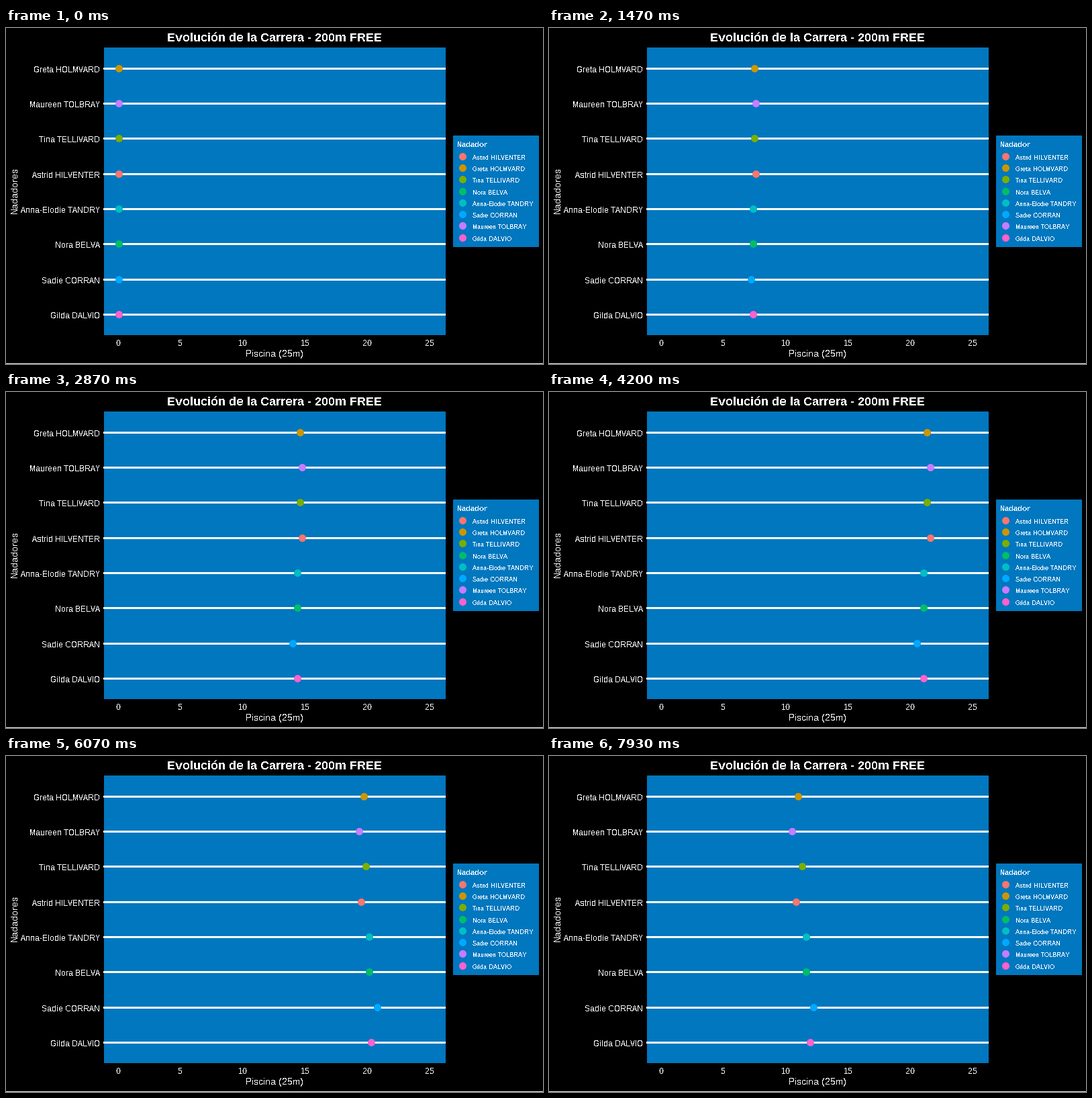
These frames come from a looping animation (800 by 500 pixels, 8 s). A matplotlib script:

```python
import math

import matplotlib.pyplot as plt
from matplotlib.animation import FuncAnimation
from matplotlib.patches import Rectangle

plt.rcParams.update({
    "font.family": "Liberation Sans",
    "text.hinting": "native",
    "text.hinting_factor": 1,
    "text.antialiased": False,
    "toolbar": "None",
})

W, H, DPI = 800, 500, 100
PT = 72 / DPI            # points per pixel
LOOP, INTERVAL = 8000, 20
STEP = LOOP / 120        # the race advances 15 times a second
POOL = "#0077BE"
START, LENGTH = 168.5, 464   # left wall and pool length in pixels
DOT = 11

# name, colour, steps for the first and second length, top lane first
SWIMMERS = [
    ("Greta HOLMVARD", "#CD9600", 74, 80),
    ("Maureen TOLBRAY", "#C77CFF", 73, 79),
    ("Tina TELLIVARD", "#7CAE00", 74, 82),
    ("Astrid HILVENTER", "#F8766D", 73, 81),
    ("Anna-Elodie TANDRY", "#00BFC4", 75, 82),
    ("Nora BELVA", "#00BE67", 75, 82),
    ("Sadie CORRAN", "#00A9FF", 77, 82),
    ("Gilda DALVIO", "#FF61CC", 75, 84),
]
LEGEND_ORDER = [3, 0, 2, 5, 4, 6, 1, 7]

fig = plt.figure(figsize=(W / DPI, H / DPI), dpi=DPI, facecolor="black")
ax = fig.add_axes([0, 0, 1, 1])
ax.set_xlim(0, W)
ax.set_ylim(H, 0)
ax.axis("off")


def box(x0, y0, x1, y1, color, z=1):
    ax.add_patch(Rectangle((x0, y0), x1 - x0, y1 - y0, facecolor=color,
                           linewidth=0, antialiased=False, zorder=z))


def label(x, y, text, px, ha="center", **kw):
    ax.text(x, y, text, color="white", fontsize=px * PT, ha=ha,
            va="baseline", zorder=5, **kw)


def dots(xs, ys, colors):
    return ax.scatter(xs, ys, s=(DOT * PT) ** 2, c=colors, linewidths=0,
                      zorder=4)


def lane_y(i):
    return math.floor(60.4 + 52.29 * i) + 0.5


def swimmer_x(step, first, second):
    if step <= first:
        part = step / first
    else:
        part = 1 - (step - first) / second
    return START + round(LENGTH * part)


# Pool, lanes and axes
box(0, 499, W, H, "white")
box(146, 29, 655, 457, POOL)
for i, (name, *_) in enumerate(SWIMMERS):
    y = lane_y(i)
    box(145, y - 1.5, 655, y + 1.5, "white", 2)
    label(140, y + 5.5, name, 12, "right")

for i in range(6):
    label(167.4 + 92.8 * i, 473, str(5 * i), 12)

label(400, 20, "Evolución de la Carrera - 200m FREE", 18, weight="bold")
label(400, 489, "Piscina (25m)", 14)
label(17, 241, "Nadadores", 14, rotation=90, rotation_mode="anchor")

# Legend
box(666, 160, 794, 326, POOL)
label(672, 177, "Nadador", 11, "left", weight="bold")
legend_ys = [math.floor(191.27 + 17.26 * i) + 0.5 for i in range(8)]
for y, i in zip(legend_ys, LEGEND_ORDER):
    label(695, y + 4.5, SWIMMERS[i][0], 9, "left")
dots([680.5] * 8, legend_ys, [SWIMMERS[i][1] for i in LEGEND_ORDER])

lanes = [lane_y(i) for i in range(8)]
racers = dots([START] * 8, lanes, [s[1] for s in SWIMMERS])


def update(frame):
    step = int((frame * INTERVAL + 14) / STEP)
    xs = [swimmer_x(step, first, second) for _, _, first, second in SWIMMERS]
    racers.set_offsets(list(zip(xs, lanes)))
    return (racers,)


anim = FuncAnimation(fig, update, frames=LOOP // INTERVAL, interval=INTERVAL,
                     repeat=True, repeat_delay=0, blit=False)
plt.show()
```
